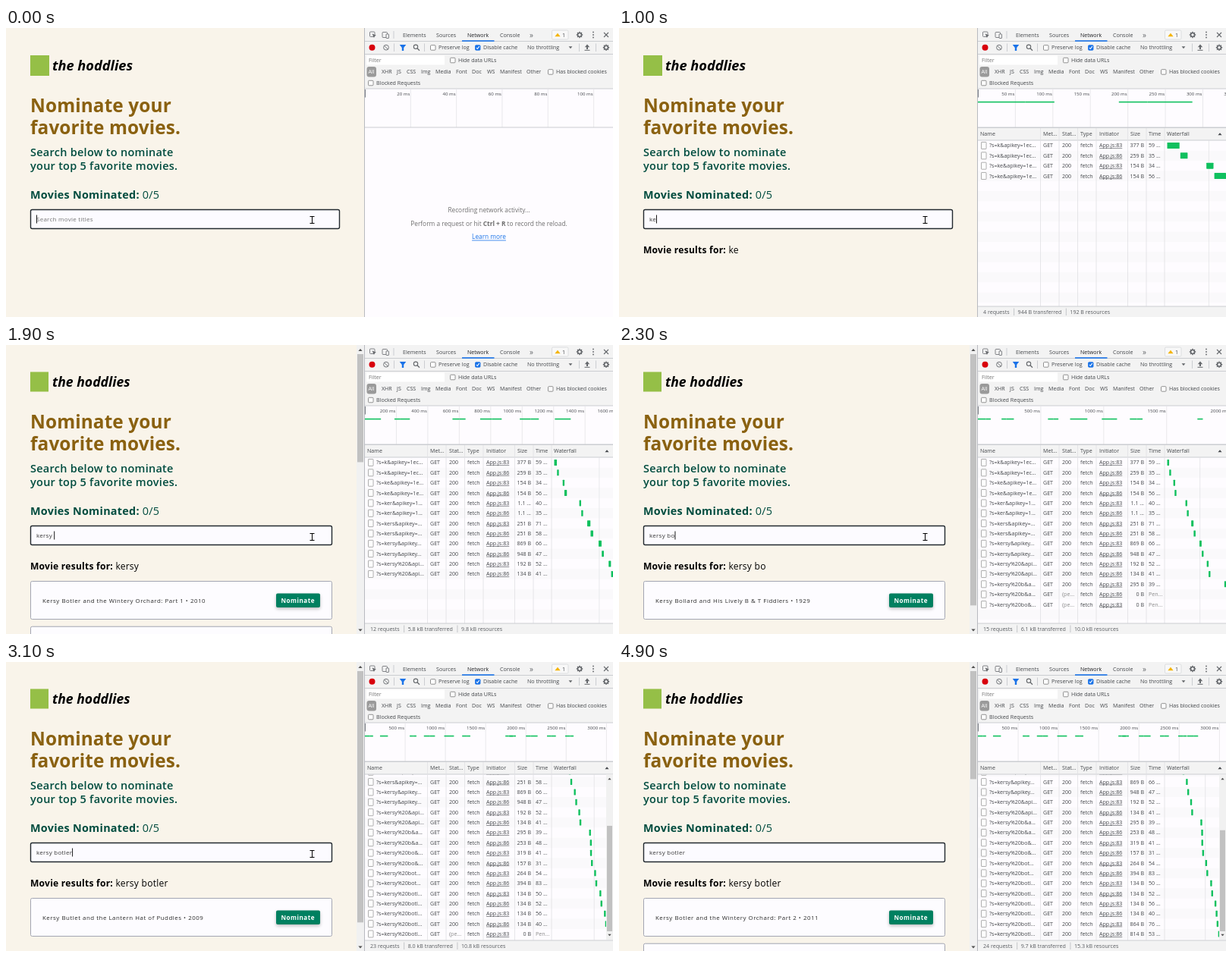
An HTML page with a canvas that plays this animation: 800x381 px, repeating every 5 s.

```html
<!DOCTYPE html>
<html lang="en">
<head>
<meta charset="utf-8">
<title>Movie search</title>
<style>
  html, body { margin: 0; width: 100%; height: 100%; overflow: hidden; background: #f9f4ea; }
  canvas { display: block; width: 800px; height: 381px; }
</style>
</head>
<body>
<canvas id="stage"></canvas>
<script>
const LOOP = 5000, W = 800, H = 381, TYPING_START = 500;
const QUERY = 'kersy botler';
const GREEN = '#0fc05e', BLUE = '#1a73e8', INK = '#44474b', GRAY = '#6e6e6e', BAR = '#f3f3f3', PANEL = '#fefcff';

const canvas = document.getElementById('stage');
const dpr = window.devicePixelRatio || 1;
canvas.width = W * dpr;
canvas.height = H * dpr;
const c = canvas.getContext('2d');

// One entry per key: start, two durations, two sizes, two resource sizes.
const keys = [
  [0, 59, 35, 377, 259, 48, 48],
  [188, 34, 56, 154, 154, 48, 48],
  [557, 40, 35, 1100, 1100, 2400, 2400],
  [733, 71, 58, 251, 251, 150, 150],
  [985, 66, 47, 869, 948, 2150, 2150],
  [1208, 52, 41, 192, 134, 150, 50],
  [1745, 39, 48, 295, 253, 208, 150],
  [1795, 41, 31, 319, 157, 150, 50],
  [2000, 54, 83, 264, 394, 100, 150],
  [2262, 50, 52, 134, 134, 50, 50],
  [2488, 56, 40, 134, 134, 50, 50],
  [2598, 76, 53, 864, 814, 2250, 2250]
];
const requests = keys.flatMap(([start, d1, d2, s1, s2, r1, r2], i) => {
  const q = encodeURIComponent(QUERY.slice(0, i + 1));
  const make = (t, dur, size, res, line) => ({
    start: t, end: t + dur, dur, size, res, line, name: `?s=${q}&apikey=1ec...`
  });
  return [make(start, d1, s1, r1, 83), make(start + d1 + 4, d2, s2, r2, 86)];
}).sort((a, b) => a.start - b.start);

// Results: time they arrive, number of cards, first title.
const results = [
  [600, 10, 'Kerrin Lane After the Rain • 2016'],
  [806, 1, 'Bolo... Kers Raat Thodi Chaltee Jo • 2006–'],
  [1053, 10, 'Kersy Botler and the Wintery Orchard: Part 1 • 2010'],
  [1785, 1, 'Kersy Bollard and His Lively B & T Fiddlers • 1929'],
  [2056, 1, 'Kersy Butlet and the Lantern Hat of Puddles • 2009'],
  [2675, 10, 'Kersy Botler and the Wintery Orchard: Part 2 • 2011']
];

function font(size, weight = 400, style = 'normal') {
  c.font = `${style} ${weight} ${size}px "Open Sans", "Noto Sans", sans-serif`;
}
function text(s, x, y, size, color, { weight, style, align = 'left', gap = 0 } = {}) {
  font(size, weight, style);
  c.letterSpacing = gap + 'px';
  c.textAlign = align;
  c.fillStyle = color;
  c.fillText(s, x, y);
  const w = c.measureText(s).width;
  c.letterSpacing = '0px';
  return w;
}
// Panel text, placed by its vertical centre.
const label = (s, x, y, color = INK, opts) => text(s, x, y + 2.5, 7.1, color, opts);
function rect(x, y, w, h, color) {
  c.fillStyle = color;
  c.fillRect(x, y, w, h);
}
function box(x, y, w, h, r, fill, stroke, lw = 1) {
  c.beginPath();
  c.roundRect(x, y, w, h, r);
  if (fill) { c.fillStyle = fill; c.fill(); }
  if (stroke) { c.strokeStyle = stroke; c.lineWidth = lw; c.stroke(); }
}
function line(pts, color, lw = 1) {
  c.beginPath();
  pts.forEach(([x, y]) => c.lineTo(x, y));
  c.strokeStyle = color;
  c.lineWidth = lw;
  c.stroke();
}
function poly(pts, color) {
  c.beginPath();
  pts.forEach(([x, y]) => c.lineTo(x, y));
  c.fillStyle = color;
  c.fill();
}
function ring(x, y, r, color, lw = 1) {
  c.beginPath();
  c.arc(x, y, r, 0, 7);
  c.strokeStyle = color;
  c.lineWidth = lw;
  c.stroke();
}
function disc(x, y, r, color) {
  c.beginPath();
  c.arc(x, y, r, 0, 7);
  c.fillStyle = color;
  c.fill();
}
function clip(x, y, w, h, draw) {
  c.save();
  c.beginPath();
  c.rect(x, y, w, h);
  c.clip();
  draw();
  c.restore();
}
function triangle(x, y, r, dir, color) {
  poly([[x - r, y + dir * r * .6], [x + r, y + dir * r * .6], [x, y - dir * r * .6]], color);
}
function checkbox(x, y, s, on) {
  box(x + .5, y - 3, 6.5, 6.5, 1, on ? BLUE : '#fff', on ? BLUE : '#767676', .8);
  if (on) line([[x + 2, y + .3], [x + 3.3, y + 1.8], [x + 5.8, y - 1.5]], '#fff', 1.1);
  label(s, x + 11, y);
}
function gear(x, y) {
  ring(x, y, 2.5, '#65686c', 1.6);
  for (let i = 0; i < 8; i++) {
    const a = i * Math.PI / 4, dx = Math.cos(a), dy = Math.sin(a);
    line([[x + dx * 3, y + dy * 3], [x + dx * 4.2, y + dy * 4.2]], '#65686c', 1.4);
  }
}
function fit(s, width) {
  font(7.1);
  if (c.measureText(s).width <= width) return s;
  while (c.measureText(s + '...').width > width) s = s.slice(0, -1);
  return s + '...';
}
function bytes(n) {
  return n < 1000 ? n + ' B' : (n / 1000).toFixed(1) + ' kB';
}
// Grid step of 1, 2 or 5 times a power of ten.
function gridStep(span, width) {
  const min = 35, px = width / span;
  let step = 10 ** Math.ceil(Math.log10(span / (width / min)));
  if (step * px >= 5 * min) step /= 5;
  if (step * px >= 2 * min) step /= 2;
  return step;
}

function drawPage(v, t) {
  const typed = QUERY.slice(0, keys.filter(k => k[0] <= t).length);
  const result = results.filter(r => r[0] <= t).pop();
  const right = result ? 430 : 440, dy = result ? -1 : 0;
  rect(0, 0, 472, H, '#f9f4ea');

  rect(32, 36 + dy / 2, result ? 24 : 25, result ? 26 : 27, '#95bf47');
  text('the hoddlies', 61, 55.5 + dy, result ? 17.6 : 18.2, '#000', { weight: 700, style: 'italic' });
  const big = { weight: 700, gap: .1 }, semi = { weight: 600, gap: .26 }, bold = { weight: 700, gap: .26 };
  text('Nominate your', 32, 111.3 + dy, 24.4, '#8a6110', big);
  text('favorite movies.', 32, 140.3 + dy, 24.4, '#8a6110', big);
  text('Search below to nominate', 32, 169 + dy, 14.5, '#004c3f', semi);
  text('your top 5 favorite movies.', 32, 186.5 + dy, 14.5, '#004c3f', semi);
  const nw = text('Movies Nominated: ', 32, 224.5 + dy, 14.4, '#004c3f', bold);
  text('0/5', 32 + nw, 224.5 + dy, 14.4, '#004c3f', { gap: .26 });

  box(32.5, 239.5 + dy, right - 33, 25, 2, '#fcfbff', '#22292f', 1.4);
  const tw = text(typed || 'Search movie titles', 40, 255 + dy, 8, typed ? '#3a3a3a' : '#757575', { gap: .26 });
  const lastKey = typed ? keys[typed.length - 1][0] + TYPING_START : 0;
  if (Math.floor((v - lastKey) / 530) % 2 === 0) {
    rect(typed ? 40 + tw : 40, 246.5 + dy, .9, 11, '#000');
  }
  if (typed) {
    const rw = text('Movie results for: ', 32, 297 + dy, 12.1, '#000', { weight: 700, gap: .22 });
    text(typed, 32 + rw, 297 + dy, 12.1, '#000', { gap: .22 });
  }
  if (result) drawResults(result[1], result[2]);
}

function drawResults(count, title) {
  for (let i = 0; i < Math.min(count, 2); i++) {
    const y = 311.5 + i * 59.7;
    box(32.5, y, 397, 50, 2, '#fdfcff', '#a3a6b2');
    if (i) continue;
    text(title, 48, y + 28.2, 7.9, '#2b2b2b', { gap: .52 });
    c.save();
    c.shadowColor = 'rgba(0,0,0,.25)';
    c.shadowBlur = 4;
    c.shadowOffsetY = 2;
    box(356, y + 16, 58, 18.5, 2, '#008060');
    c.restore();
    text('Nominate', 362.5, y + 28.2, 8.1, '#fff', { weight: 700, gap: .5 });
  }
  rect(462, 0, 10, H, '#f1f1f1');
  triangle(467, 6.5, 2.6, 1, '#505050');
  triangle(467, 376, 2.6, -1, '#505050');
  rect(463, 12, 8, 357 * H / (350 + count * 60.5), '#c1c1c1');
}

function drawToolbars() {
  const dark = '#65686c', rule = '#cbcdd1';
  rect(472, 0, 328, H, PANEL);
  rect(472, 0, 328, 80, BAR);
  [17.5, 34.5, 80].forEach(y => line([[472, y], [W, y]], rule));

  box(479.5, 5, 6.5, 6.5, 1, null, dark, .8);
  poly([[482.5, 7.5], [488, 9.8], [485.8, 10.6], [485, 13]], dark);
  box(496, 5.5, 6.5, 7, 1, null, dark, .8);
  box(501, 8, 3.5, 5.5, .5, BAR, dark, .8);
  line([[511, 4], [511, 14]], rule);
  label('Elements', 523, 9);
  label('Sources', 567, 9);
  label('Network', 608, 9, '#202124');
  rect(601, 16.2, 42.5, 1.6, BLUE);
  label('Console', 651, 9);
  text('»', 690, 12.5, 10, dark);
  box(719.5, 3, 21.5, 12, 1.5, '#f8f8f8', '#d5d7da', .8);
  triangle(727, 9, 3.6, 1, '#f4b400');
  label('1', 733, 9);
  gear(756, 9);
  [5.5, 9, 12.5].forEach(y => disc(774, y, .9, dark));
  line([[788, 6], [794, 12]], dark, 1.1);
  line([[794, 6], [788, 12]], dark, 1.1);

  disc(482.5, 25.7, 4, '#d8000c');
  ring(501, 25.7, 3.4, dark, .9);
  line([[498.6, 23.3], [503.4, 28.1]], dark, .9);
  [511.5, 551.5, 755.5, 777.5].forEach(x => line([[x, 20.5], [x, 31]], rule));
  poly([[518.7, 22], [527.3, 22], [524.2, 26], [524.2, 30], [521.8, 30], [521.8, 26]], BLUE);
  ring(540, 24.8, 2.7, dark, 1.1);
  line([[542, 26.8], [545, 29.8]], dark, 1.3);
  checkbox(559, 25.7, 'Preserve log');
  checkbox(618, 25.7, 'Disable cache', true);
  label('No throttling', 687, 25.7);
  triangle(744, 25.7, 2.4, -1, dark);
  triangle(766, 23.4, 3.2, 1, dark);
  rect(765, 24, 2, 4, dark);
  rect(762.5, 28.8, 7, 1, dark);
  gear(791, 25.7);

  rect(475, 36.5, 103, 12, '#fff');
  label('Filter', 478, 42.3, '#757575');
  checkbox(585, 42.3, 'Hide data URLs');
  box(475.5, 51, 12.5, 13.5, 3, '#9a9a9a');
  label('All', 477.5, 57.7, '#fff');
  Object.entries({ XHR: 495, JS: 515, CSS: 528, Img: 547, Media: 566, Font: 593, Doc: 614, WS: 634,
    Manifest: 651, Other: 686 }).forEach(([s, x]) => label(s, x, 57.7));
  checkbox(714, 57.7, 'Has blocked cookies');
  checkbox(477, 72.3, 'Blocked Requests');
}

function drawOverview(t) {
  const done = requests.filter(r => r.end <= t);
  const last = Math.max(0, ...requests.filter(r => r.start <= t).map(r => r.end <= t ? r.end : r.start));
  let span = 1;
  while (span < Math.max(100, last)) span *= 1.25;
  const px = 327 / span, step = gridStep(span, 327);
  for (let g = step; g < span + step; g += step) {
    const x = 473 + g * px;
    line([[x, 81], [x, 131]], '#e4e4e6', .8);
    text(g + ' ms', x - 1, 89.4, 6.1, INK, { align: 'right' });
  }
  done.forEach(r => rect(473 + r.start * px, 96.8, (r.dur + 4) * px, 1.6, GREEN));
  rect(472.5, 81, 1.5, 10.5, '#7d8086');
  line([[472, 131], [W, 131]], '#cbcdd1');
}

function drawEmpty() {
  const mid = 636.5, y = 260.5, size = 8.3;
  text('Recording network activity...', mid, 243, size, GRAY, { align: 'center' });
  const parts = [['Perform a request or hit ', 400], ['Ctrl + R', 700], [' to record the reload.', 400]];
  const widths = parts.map(([s, weight]) => (font(size, weight), c.measureText(s).width));
  let x = mid - widths.reduce((a, b) => a + b) / 2;
  parts.forEach(([s, weight], i) => {
    text(s, x, y, size, GRAY, { weight });
    x += widths[i];
  });
  const w = text('Learn more', mid, 278.3, size, BLUE, { align: 'center' });
  rect(mid - w / 2, 279.6, w, .8, BLUE);
}

function drawTable(t) {
  const rows = requests.filter(r => r.start <= t);
  const done = rows.filter(r => r.end <= t);
  const top = 148.3, bottom = 365.2, pitch = 13.36, view = bottom - top;
  const total = rows.length * pitch, scroll = Math.max(0, total - view);
  const left = 722.5, right = scroll ? 791 : W;
  const max = Math.max(60, ...rows.map(r => r.end <= t ? r.end : r.start));
  const px = (right - left) / max;

  clip(473, top, 327, view + 1.5, () => {
    for (let i = 0; i < Math.max(18, rows.length); i++) {
      if (i % 2) rect(473, top + i * pitch - scroll, 327, pitch, '#faf9fb');
    }
    const step = gridStep(max, right - left);
    for (let g = step; left + g * px < right; g += step) {
      line([[left + g * px, top], [left + g * px, bottom + 2]], '#e4e4e6', .8);
    }
    rows.forEach((r, i) => {
      const y = top + (i + .5) * pitch - scroll;
      if (y > top - pitch) drawRow(r, y, r.end <= t, left + r.start * px, r.dur * px, right);
    });
  });

  rect(473, 131.5, 327, 16.5, BAR);
  line([[473, 131.5], [W, 131.5]], '#cbcdd1');
  line([[473, 148], [W, 148]], '#cbcdd1');
  Object.entries({ Name: 476, 'Met...': 559, 'Stat...': 584, Type: 608, Initiator: 633, Size: 674, Time: 698,
    Waterfall: 722 }).forEach(([s, x]) => label(s, x, 139.8));
  triangle(792, 139.8, 2.6, 1, INK);
  [555.5, 580, 604.5, 629, 670.5, 695, 719].forEach(x => line([[x, 132], [x, 367]], '#e0e0e4', .8));

  if (scroll) {
    rect(791, top, 9, 218, '#f1f1f1');
    triangle(795.5, 154, 2.2, 1, '#505050');
    triangle(795.5, 360, 2.2, -1, '#505050');
    const thumb = 197 * view / total;
    rect(792, 355 - thumb, 7, thumb, '#c1c1c1');
  }

  rect(473, 367, 327, 14, BAR);
  line([[473, 367], [W, 367]], '#cbcdd1');
  const sum = key => bytes(done.reduce((n, r) => n + r[key], 0));
  let x = 480;
  [rows.length + ' requests', sum('size') + ' transferred', sum('res') + ' resources'].forEach((s, i) => {
    if (i) {
      line([[x, 369.5], [x, 379]], '#b9bbbf', .8);
      x += 5;
    }
    x += label(s, x, 374.2, '#5a5d61') + 6;
  });
}

function drawRow(r, y, done, x, width, right) {
  const color = done ? INK : '#8a8a8a';
  box(477.5, y - 4.5, 6.5, 9, .5, '#fff', '#9a9a9a', .8);
  label(fit(r.name, 63.5), 488, y);
  label('GET', 559, y);
  label(done ? '200' : '(pe...', 584, y, color);
  label('fetch', 608, y);
  const w = label('App.js:' + r.line, 633, y);
  rect(633, y + 3.5, w, .6, INK);
  label(done ? fit(bytes(r.size), 20) : '0 B', 692, y, INK, { align: 'right' });
  label(done ? r.dur + ' ...' : 'Pen...', 698, y, color);
  if (done) box(x, y - 4, Math.min(Math.max(2.4, width), right - x), 8, .6, GREEN);
}

// Pointer: resting, then over the filter box and out at the top.
const path = [[3650, 403, 253], [3900, 530, 60], [4050, 562, 42], [4200, 594, 13], [4400, 622, -16]];
function pointerAt(v) {
  if (v <= path[0][0]) return [403, 253];
  const i = path.findIndex(p => p[0] >= v);
  if (i < 0) return null;
  const [t0, x0, y0] = path[i - 1], [t1, x1, y1] = path[i];
  const k = (v - t0) / (t1 - t0);
  return [x0 + (x1 - x0) * k, y0 + (y1 - y0) * k];
}
function drawPointer(v) {
  const at = pointerAt(v);
  if (!at) return;
  c.save();
  c.translate(...at);
  if (at[1] > 238 && at[0] < 430) {
    line([[-2.5, -4.5], [3.5, -4.5]], '#000');
    line([[-2.5, 4.5], [3.5, 4.5]], '#000');
    line([[.5, -4.5], [.5, 4.5]], '#000');
  } else {
    const hand = [[-1, -4], [.6, -4], [.8, 0], [4.6, 1], [4.8, 4], [3.6, 7.5], [-1.2, 7.5], [-4, 3], [-3, 2], [-1, 3.4]];
    const arrow = [[0, 0], [0, 11], [2.6, 8.6], [4.4, 12.4], [6, 11.6], [4.3, 8], [7.6, 8]];
    const shape = at[1] < 22 ? hand : arrow;
    poly(shape, '#fff');
    line([...shape, shape[0]], '#000', .9);
  }
  c.restore();
}
function drawTooltip() {
  box(562, 51.5, 100, 15, 1, '#f1f1f1', '#b5b5b5', .9);
  clip(562, 51.5, 97, 15, () => label('e.g. /small[d]+/ url:a.com/b', 567, 59, '#575757'));
}

function draw(v) {
  const t = v - TYPING_START;
  c.setTransform(dpr, 0, 0, dpr, 0, 0);
  drawPage(v, t);
  drawToolbars();
  drawOverview(t);
  if (t < 0) drawEmpty(); else drawTable(t);
  line([[472.5, 0], [472.5, H]], '#b8bac0');
  if (v >= 4100 && v < 4600) drawTooltip();
  drawPointer(v);
}

const begin = performance.now();
function frame() {
  draw((performance.now() - begin) % LOOP);
  requestAnimationFrame(frame);
}
frame();
</script>
</body>
</html>
```
